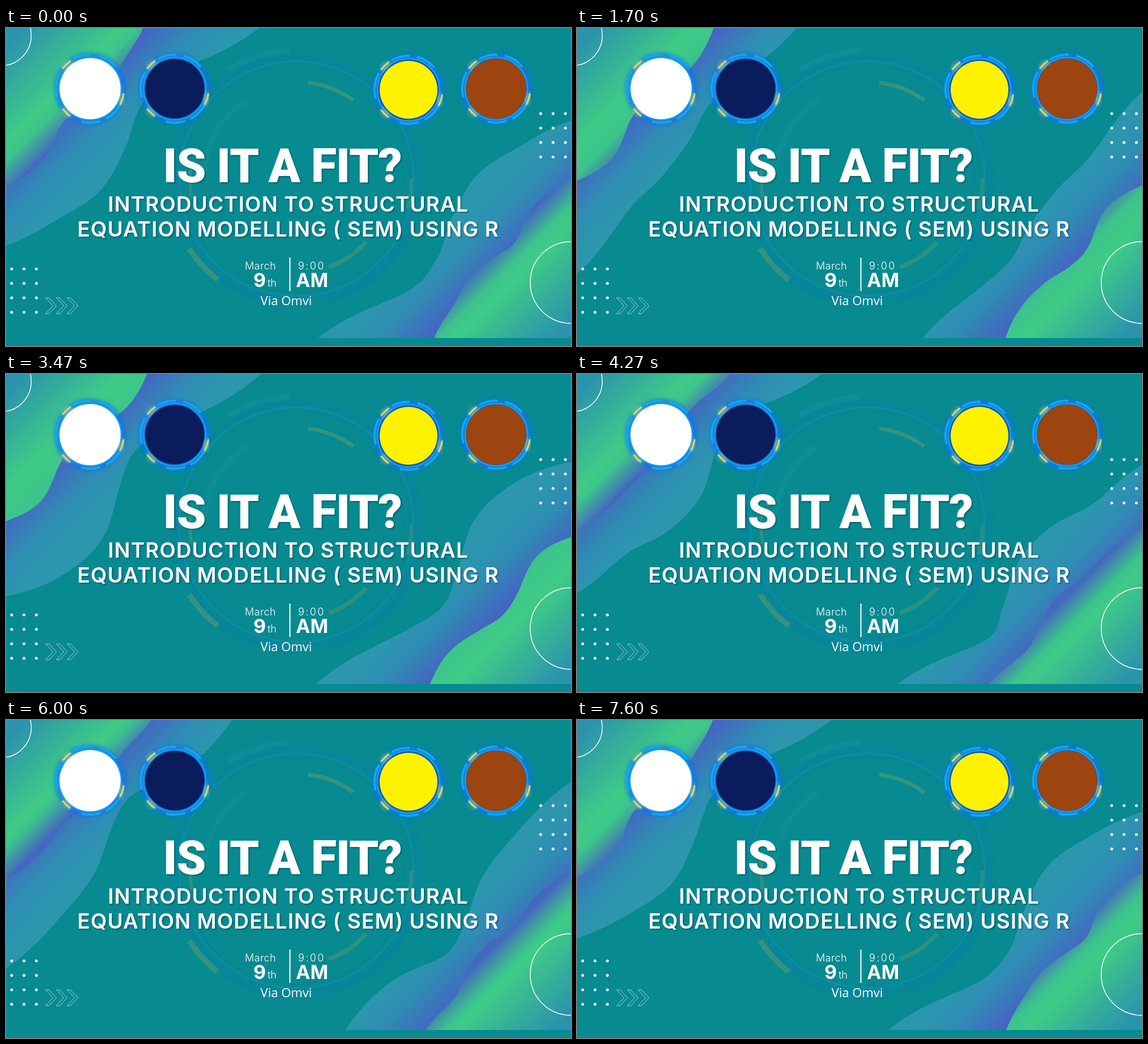
Animation, 998 px wide and 561 px high, one loop 7660 ms. Source, as an HTML page:

```html
<!DOCTYPE html>
<html lang="en">
<head>
<meta charset="utf-8">
<title>Webinar banner</title>
<style>
  html, body { margin: 0; width: 100%; height: 100%; overflow: hidden; background: #078a90; }
  svg { display: block; width: 100vw; height: 100vh; }
  text { fill: #fff; font-family: Inter, "Open Sans", sans-serif; }
  .mid { text-anchor: middle; }
  .title { font: 800 83px Roboto, "Open Sans", sans-serif; letter-spacing: -1px; }
  .sub { font-size: 37px; font-weight: 600; letter-spacing: 1.1px; }
  .shade { filter: drop-shadow(2px 2px 1px rgba(0, 70, 85, .55)); }
  .small { font-size: 18px; font-weight: 300; }
  .big { font-size: 34px; font-weight: 700; }
  .via { font: 22px "Open Sans", sans-serif; }
  .line { fill: none; stroke: #fff; }
</style>
</head>
<body>
<svg viewBox="0 0 998 561" preserveAspectRatio="none">
  <defs>
    <linearGradient id="outerFill" gradientUnits="userSpaceOnUse" x2="200" y2="200">
      <stop offset=".58" stop-color="#4a5cc6"/>
      <stop offset=".84" stop-color="#2f8cb4"/>
      <stop offset="1" stop-color="#2c96ae"/>
    </linearGradient>
    <linearGradient id="innerFill" gradientUnits="userSpaceOnUse" x2="200" y2="200">
      <stop offset=".09" stop-color="#2b94ac"/>
      <stop offset=".51" stop-color="#3fcb86"/>
      <stop id="greenEnd" stop-color="#3cc48c"/>
      <stop id="blueEnd" stop-color="#4468c0"/>
    </linearGradient>
    <clipPath id="panel"><path d="M0 0H998V547H0Z"/></clipPath>
    <filter id="glow" x="-30%" y="-30%" width="160%" height="160%"><feGaussianBlur stdDeviation="4"/></filter>
    <g id="waves">
      <path id="outer" fill="url(#outerFill)"/>
      <path id="inner" fill="url(#innerFill)"/>
    </g>
  </defs>

  <path fill="#078a90" d="M0 0H998V561H0Z"/>
  <g clip-path="url(#panel)">
    <use href="#waves"/>
    <use href="#waves" transform="rotate(180 499 273.5)"/>
  </g>
  <g id="halo" fill="none"></g>

  <g class="line" stroke-width="1.4">
    <circle cx="-9" cy="13" r="53.6"/>
    <circle cx="998" cy="449" r="72"/>
    <path stroke-width="2" d="M501.5 405V464"/>
  </g>
  <g id="dots" fill="#fff"></g>
  <g id="chevrons" class="line" stroke-width=".8" opacity=".75"></g>
  <g id="badges"></g>

  <g class="shade">
    <text class="title mid" x="488" y="272">IS IT A FIT?</text>
    <text class="sub mid" x="498.5" y="323.5">INTRODUCTION TO STRUCTURAL</text>
    <text class="sub mid" x="498.5" y="368">EQUATION MODELLING ( SEM) USING R</text>
  </g>
  <text class="small" x="422" y="426" letter-spacing=".4">March</text>
  <text class="small" x="516" y="426" letter-spacing="2.4">9:00</text>
  <text class="big" x="437" y="457">9</text>
  <text class="small" x="462" y="456">th</text>
  <text class="big" x="512" y="457">AM</text>
  <text class="via mid" x="495" y="489">Via Omvi</text>
</svg>
<script>
const LOOP = 7660, FRAME = 80, FRAMES = 96;
const $ = id => document.getElementById(id);

function add(parent, tag, attrs) {
  const node = document.createElementNS("http://www.w3.org/2000/svg", tag);
  for (const key in attrs) node.setAttribute(key, attrs[key]);
  return parent.appendChild(node);
}

// Arc from angle a to b in degrees, clockwise from the right.
function arc(parent, cx, cy, r, a, b, stroke, width, extra) {
  const at = deg => {
    const t = deg * Math.PI / 180;
    return (cx + r * Math.cos(t)).toFixed(1) + " " + (cy + r * Math.sin(t)).toFixed(1);
  };
  add(parent, "path", {
    d: `M${at(a)}A${r} ${r} 0 ${b - a > 180 ? 1 : 0} 1 ${at(b)}`,
    fill: "none", stroke, "stroke-width": width, ...extra
  });
}

function drawHalo() {
  const g = $("halo"), cx = 513, cy = 266;
  const ring = (r, stroke, width, opacity, filter = "none") =>
    add(g, "circle", { cx, cy, r, stroke, "stroke-width": width, opacity, filter });
  ring(213, "#0878bd", 14, .25, "url(#glow)");
  ring(207, "#2aa4b8", 4, .2);
  ring(190, "#0a7aa0", 2, .2);
  const band = (r, a, b, color, width, opacity) => arc(g, cx, cy, r, a, b, color, width, { opacity });
  band(226, 238, 267, "#1a9aae", 10, .25);
  band(164, 183, 238, "#25a0a8", 10, .18);
  band(222, 20, 75, "#0878b5", 8, .2);
  band(222, 95, 140, "#0878b5", 8, .2);
  band(171, 277, 306, "#b6b04a", 7, .25);
  band(188, 170, 190, "#b6b04a", 6, .22);
  band(226, 128, 147, "#b6b04a", 10, .25);
  band(166, 42, 70, "#b6b04a", 8, .2);
  band(203, 0, 15, "#b6b04a", 6, .2);
}

function drawBadge(cx, cy, r, fill) {
  const g = $("badges");
  add(g, "circle", { cx, cy, r: 57, fill: "none", stroke: "#0872f2", "stroke-width": 9, filter: "url(#glow)" });
  add(g, "circle", { cx, cy, r: 55, fill: "#0b55b5", stroke: "#169be8", "stroke-width": 3 });
  for (const [a, b] of [[240, 272], [285, 320], [20, 62], [72, 105], [165, 210]])
    arc(g, cx, cy, 60, a, b, "#16a5f0", 4);
  for (const [a, b] of [[8, 28], [126, 144], [216, 235]]) {
    arc(g, cx, cy, 59, a, b, "#ffe35a", 6, { filter: "url(#glow)", opacity: .7 });
    arc(g, cx, cy, 60, a, b, "#d8d96a", 3);
  }
  add(g, "circle", { cx, cy, r, fill });
}

function drawDots(left, top) {
  for (let i = 0; i < 12; i++)
    add($("dots"), "circle", { cx: left + i % 3 * 21.8, cy: top + Math.floor(i / 3) * 25.5, r: 2.5 });
}

drawHalo();
drawBadge(148.5, 107, 54, "#ffffff");
drawBadge(298, 107, 52, "#0b1c5c");
drawBadge(711, 109, 51, "#fff200");
drawBadge(866, 107, 53, "#9c4510");
drawDots(10, 425);
drawDots(944.5, 151);
for (const x of [70, 89, 108])
  add($("chevrons"), "path", { d: `M${x} 476h6l13 14l-13 14h-6l13-14z` });

// Radius every 15 degrees around the corner: mean, cosine and sine swing.
const outerRadii = [
  [419, 28, -15], [312, -7, -28], [270, 5, 13], [285, 13, 20],
  [319, 13, -14], [350, 0, -33], [411, -27, -5]
];
const innerRadii = [
  [266, -24, 11], [219, -3, -4], [194, 14, 10], [192, 5, 23],
  [202, -6, 14], [234, 10, 3], [263, 17, 8]
];

function wavePath(radii, phase) {
  const c = Math.cos(phase), s = Math.sin(phase);
  const r = radii.map(([mean, a, b]) => mean + a * c + b * s);
  const at = i => i < 0 ? 2 * r[0] - r[1] : i > 6 ? 2 * r[6] - r[5] : r[i];
  let d = "M0 0";
  for (let deg = 0; deg <= 90; deg += 2.5) {
    const i = Math.min(5, Math.floor(deg / 15)), u = deg / 15 - i;
    const [p, q, v, w] = [at(i - 1), at(i), at(i + 1), at(i + 2)];
    const radius = q + u / 2 * (v - p + u * (2 * p - 5 * q + 4 * v - w + u * (3 * (q - v) + w - p)));
    const t = deg * Math.PI / 180;
    d += `L${(radius * Math.cos(t)).toFixed(1)} ${(radius * Math.sin(t)).toFixed(1)}`;
  }
  return d + "Z";
}

function draw(now) {
  const step = Math.min(FRAMES - 1, Math.floor(now % LOOP / FRAME));
  const turn = step / FRAMES * 2 * Math.PI;
  $("outer").setAttribute("d", wavePath(outerRadii, 2 * turn));
  $("inner").setAttribute("d", wavePath(innerRadii, 4 * turn));
  // The green swells out to the edge and draws back once per inner cycle.
  const swell = .08 + .09 * Math.cos(4 * turn - 3.9);
  $("greenEnd").setAttribute("offset", .57 + swell);
  $("blueEnd").setAttribute("offset", .72 + swell);
}

const start = performance.now();
function tick() {
  draw(performance.now() - start);
  requestAnimationFrame(tick);
}
tick();
</script>
</body>
</html>
```
